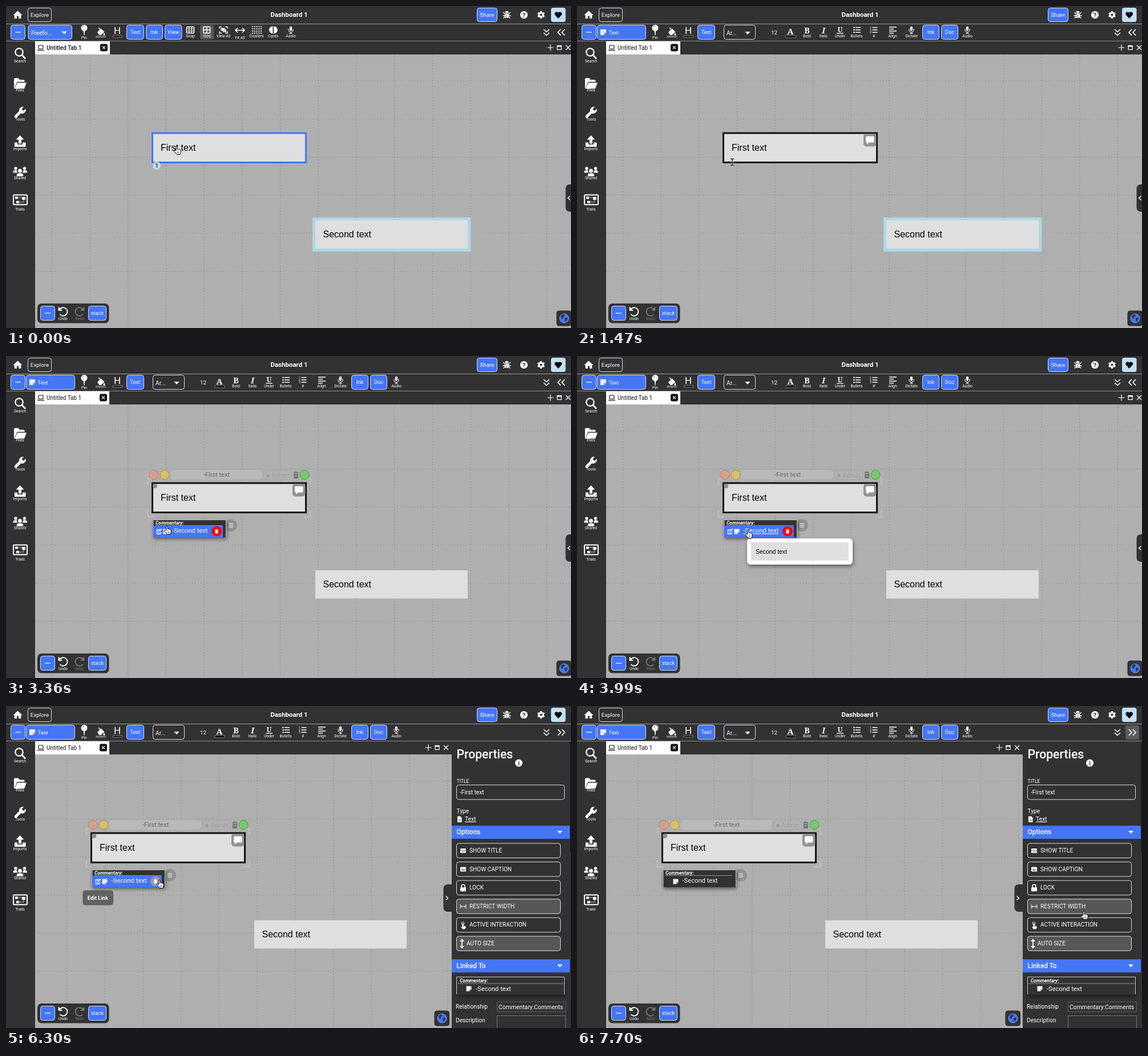
Recreate the animation shown at these times as an HTML page. Size 990 by 565 pixels, loop 8000 ms.

```html
<!DOCTYPE html>
<html lang="en">
<head>
<meta charset="utf-8">
<title>Dashboard</title>
<style>
html, body { margin: 0; width: 100%; height: 100%; overflow: hidden; background: #323232; }
svg { display: block; width: 990px; height: 565px; font-family: Roboto, sans-serif; }
.doc { font-family: "Liberation Sans", Arial, sans-serif; }
</style>
</head>
<body>
<script>
const DARK = '#323232', BLUE = '#4476f7', PAPER = '#dfdfdf', CANVAS = '#afafaf';

// Drawing helpers, each returning SVG markup
const rect = (x, y, w, h, fill, rx = 0, stroke = 'none', sw = 1, attrs = '') =>
  `<rect x="${x}" y="${y}" width="${w}" height="${h}" rx="${rx}" fill="${fill}" stroke="${stroke}" stroke-width="${sw}" ${attrs}/>`;
const circle = (x, y, r, fill, stroke = 'none', sw = 1, attrs = '') =>
  `<circle cx="${x}" cy="${y}" r="${r}" fill="${fill}" stroke="${stroke}" stroke-width="${sw}" ${attrs}/>`;
const shape = (d, fill = '#fff', attrs = '') => `<path d="${d}" fill="${fill}" ${attrs}/>`;
const line = (d, w = 1.5, color = '#fff', attrs = '') =>
  `<path d="${d}" fill="none" stroke="${color}" stroke-width="${w}" ${attrs}/>`;
const text = (x, y, s, size = 10, fill = '#fff', attrs = '') =>
  `<text x="${x}" y="${y}" font-size="${size}" fill="${fill}" ${attrs}>${s}</text>`;
const MID = 'text-anchor="middle"', BOLD = 'font-weight="700"', MEDIUM = 'font-weight="500"', SHADOW = 'filter="url(#shadow)"';
const label = (x, y, s, fill = '#fff') => text(x, y, s, 6.9, fill, MID);
const at = (x, y, body, scale = 1) => `<g transform="translate(${x} ${y}) scale(${scale})">${body}</g>`;
const group = (id, body) => `<g id="${id}">${body}</g>`;
const button = (x, y, w, h, s = '', size = 9.5, fill = BLUE) =>
  rect(x + .5, y + .5, w - 1, h - 1, fill, 4, '#d8dff2') + text(x + w / 2, y + h / 2 + 3.3, s, size, '#fff', MID);
const minus = (x, y) => button(x, y, 26, 26) + line(`M${x + 8} ${y + 13}h10`, 1.2);
const triangle = (x, y) => shape(`M${x - 4.5} ${y - 2}h9l-4.5 5z`);
const note = (x, y, s = 1) => at(x, y, shape('M-5 -5H5V1L1 5H-5z', '#eee') + shape('M1 5V1H5z', '#aaa'), s);
const mic = (x, y, s = 1) => at(x, y, rect(-2.3, -7, 4.6, 9, '#fff', 2.3) + line('M-4.5 -2V0a4.5 4.5 0 0 0 9 0V-2M0 4.5V7M-3 7H3', 1.2), s);
const trash = (x, y) => at(x, y, shape('M-2.7 -2h5.4l-.4 5.5h-4.6zM-3.2 -3.4h6.4v1h-6.4zM-1 -4.2h2v1h-2z'));
const pin = (x, y, s = 1) => at(x, y, circle(0, -6, 5.5, '#fff') + shape('M-1.2 -1h2.4L.5 7h-1z') +
  line('M-3 -7a3 3 0 0 1 2.5 -2.4', .8, DARK), s);
const bars = (x, y, w, gap, sw = 1.4) => line([-1, 0, 1].map(i => `M${x - w / 2} ${y + i * gap}h${w}`).join(''), sw);
const dots = (x, y, nx, ny, gap, r) => Array.from({ length: nx * ny }, (_, i) =>
  circle(x + (i % nx - (nx - 1) / 2) * gap, y + (Math.floor(i / nx) - (ny - 1) / 2) * gap, r, '#fff')).join('');
const person = (x, y, s) => at(x, y, circle(0, -4, 3.6, '#fff') + shape('M-6 6V4a4 4 0 0 1 4-3.6h4A4 4 0 0 1 6 4V6z'), s);
const curl = (x, y, dir, color) => `<g transform="translate(${x} ${y}) scale(${dir} 1)">` +
  line('M-6 -3.5A7.3 7.3 0 1 1 -5.5 5', 1.9, color) + shape('M-8.3 -8.5V-1.3H-1z', color) + '</g>';
const gear = (x, y) => at(x, y, circle(0, 0, 3.6, 'none', '#fff', 3) +
  [0, 60, 120].map(a => line('M0 -6.6V-4.5M0 4.5V6.6', 3, '#fff', `transform="rotate(${a})"`)).join(''));
const bug = (x, y) => at(x, y, shape('M-3.2 -3a3.2 3.2 0 0 1 6.4 0z') + rect(-3.7, -2.2, 7.4, 8.4, '#fff', 3.5) +
  line('M-6.5 -4L-3 -1M6.5 -4L3 -1M-7 2H7M-6 6.5L-3 4M6 6.5L3 4', 1.3) + line('M0 0V6', .8, DARK));
const heading = (x, y) => text(x, y, 'Commentary:', 8.4, '#fff', BOLD + ' font-style="italic"');

function grid() {
  let d = '';
  for (let x = 80.2; x < 1110; x += 66.72) d += `M${x} 85V565`;
  for (let y = 131.7; y < 500; y += 66.72) d += `M51 ${y}H1110`;
  return line(d, 1, '#828282', 'stroke-dasharray="1.2 3.8"');
}

function decorations() {
  return line('M248 226V215H257M525 215H533.5V226M248 271V282.5H258M522 282.5H533.5V271', 2.5, '#bdbdbd') +
    circle(259, 208.5, 8, '#d6a08f', '#bd7f6c') + circle(278, 208.5, 8, '#d6bf6d', '#ad9244') +
    rect(288, 200, 161, 17, '#b9b9b9', 6) + text(369, 212, '-First text', 11, '#686868', MID) +
    rect(451, 201, 50, 16, '#b2b2b2', 7, '#a5a5a5') + circle(459, 210, 3, '#9d9d9d') + text(465, 213, 'Admin', 11, '#9d9d9d') +
    rect(504, 203, 8, 12, '#777', 1.5) + line('M505 206h6M506 210h4', 1.2, '#bbb') +
    circle(523, 208.5, 8, '#75c96c', '#4e9a47') + circle(261, 228, 4, '#8e8e8e');
}

function linkBar() {
  const link = x => rect(x, -2.3, 7, 4.6, 'none', 2.3, '#fff', 1.3);
  return rect(252, 284, 155, 25.5, '#dcdcdc', 12.7) + circle(265, 296.7, 12.5, '#b9dcf5') +
    text(265, 301, '1', 12, '#111', MID) +
    [291, 316.7, 342.3, 368, 393.7].map(x => circle(x, 296.7, 10.7, DARK)).join('') +
    at(291, 296.7, `<g transform="rotate(-45)">${link(-6)}${link(-1)}</g>`) +
    shape('M311.5 294h5l6-.5v1.8l-3 .3v3l-3 2.5h-3l-2.5-3z') + pin(342.3, 297.5, .55) + mic(368, 296.7, .7) + bars(393.7, 296.7, 9, 3.2, 1.2);
}

function linkMenu() {
  return circle(394, 297, 11, '#929292') + bars(394, 297, 8, 3, 1) +
    rect(257.5, 287, 128.5, 31, DARK, 0, 'none', 1, SHADOW) + line('M258 318V287.5H385.5V318', 1, '#ccc') +
    group('rowHover', rect(258, 298, 122, 20, BLUE) +
      line('M271 305H264.5V312H271V308.5M267 309.5L273 303', 1.3) +
      circle(369, 307.5, 9, 'red', 'none', 1, 'id="trashDisc"') + trash(369, 308)) +
    heading(262, 295.5) + line('M262 297.5H379', .7, '#bbb') +
    note(280, 308, .9) + text(291.5, 310, '-Second text', 11.2) + group('underline', line('M291.5 312H353', 1));
}

const preview = rect(298, 320, 185, 46, '#fff', 6, 'none', 1, SHADOW) +
  rect(305, 327, 171, 32, PAPER) + text(313, 346.5, 'Second text', 10.4, '#000', 'class="doc"');

const tip = (x, y, w, h) => rect(x, y, w, h, '#616161', 4, '#585858');

function world() {
  return group('world', grid() +
    group('linkHighlight', rect(537, 371, 277.5, 60, '#add8e6')) + rect(542, 376, 267, 49.5, PAPER) +
    text(555.5, 406, 'Second text', 16, '#000', 'class="doc"') +
    rect(256.5, 223, 269, 51.5, PAPER, 0, BLUE, 3, 'id="firstBox"') +
    text(271, 254, 'First text', 16, '#000', 'class="doc"') +
    group('badge', circle(264, 280, 7, '#b9dcf5') + text(264, 284, '1', 11, '#111', MID)) +
    group('comment', rect(502, 224, 22.5, 22.5, '#929292', 5) + rect(506, 228.5, 14.5, 11, '#fff', 2) + shape('M508 238v5l4-4z')) +
    group('decorations', decorations()) + group('linkBar', linkBar()) + group('linkMenu', linkMenu()) + group('preview', preview) +
    group('linkTip', tip(194.5, 321, 142, 39) +
      text(203, 336.5, 'Tap to view links; double tap', 9.3, '#fff', BOLD) + text(203, 350.5, 'to open link collection', 9.3, '#fff', BOLD)) +
    group('editTip', tip(242, 324, 52.5, 25) + text(268, 340, 'Edit Link', 9.4, '#fff', BOLD + ' ' + MID)));
}

function edge() {
  return group('edge', line('M948.5 73h11M954 67.5v11M981 69l8 8M989 69l-8 8', 1.2) +
    rect(966, 69.5, 7, 7, 'none', 0, '#fff', 1.2) + line('M965.5 70.5h8', 2) +
    shape('M995 313h-7.5a7 7 0 0 0-7 7v34a7 7 0 0 0 7 7h7.5z', DARK) +
    line('M988.5 333.5l-4 3.5 4 3.5', 1.4, '#fff', 'id="handleArrow"') +
    rect(965, 535, 25.5, 26, DARK, 4, '#25272d') + circle(978, 548, 8, BLUE) +
    shape('M972 544q3-4 6-3l1 3-3 2v3l-3-1zM979 548l4-2 1 3-3 5-2-2z', '#273756') + circle(978, 548, 8, 'none', '#7ba4ff', .8));
}

function sidebar() {
  const names = [['Search', 99], ['Files', 150], ['Tools', 201], ['Imports', 253], ['Shared', 304], ['Trails', 359]];
  return rect(0, 62, 51, 503, DARK) + names.map(([s, y]) => label(24.5, y, s)).join('') +
    circle(23, 81, 6.7, 'none', '#fff', 2.2) + line('M28 86l6 6.5', 2.6) +
    shape('M14 146V128q0-1.5 1.5-1.5h6l2.5 3h7q1.5 0 1.5 1.5v2H19.5z') + shape('M20 134.5h16l-4 10.5H15z') +
    line('M17 194L26 185', 4.6, '#fff', 'stroke-linecap="round"') + shape('M23 184a6.5 6.5 0 0 1 8-7l-3.5 4 3 3 4-3.5a6.5 6.5 0 0 1-8 8z') +
    shape('M24.5 227l7 7.5h-4.5v7h-5v-7h-4.5zM15 239.5h5v3.5h9v-3.5h5.5v7.5H15z') +
    person(17, 288, .75) + person(32.5, 288, .75) + circle(24.5, 289, 5.5, DARK) + person(24.5, 293, .95) +
    rect(13, 331.5, 24, 17, 'none', 1.5, '#fff', 2) + rect(16, 334.5, 5, 4, '#fff') + rect(28, 335, 6, 5, '#fff') +
    rect(18, 342, 5, 4, '#fff') + line('M22 336h5M31 340v4h-7', 1, '#fff', 'stroke-dasharray="2 1"');
}

function header() {
  return rect(0, 0, 990, 62, DARK) + rect(0, 31, 990, 1, '#9b9b9b') + rect(0, 61, 990, 1, '#8b8b8b') +
    shape('M20.5 8.5l8 7.5h-2.2v6h-4.3v-4.5h-3v4.5h-4.3v-6H12.5z') + button(38, 3, 42, 25, 'Explore', 9.8, DARK) +
    text(496, 19, 'Dashboard 1', 11.5, '#fff', BOLD + ' ' + MID) +
    button(825, 3, 36, 25, 'Share', 9.8) + bug(877.5, 15) + circle(907.5, 15.5, 6.6, '#fff') +
    text(907.5, 19.5, '?', 11, DARK, BOLD + ' ' + MID) + gear(937.5, 15.5) +
    rect(955, 3, 25.5, 25, '#c1e0f8', 4) + shape('M967.7 22l-5.5-6a3.3 3.3 0 0 1 5.5-4.3 3.3 3.3 0 0 1 5.5 4.3z', '#000') +
    group('collapseHover', rect(961, 34, 24, 25, '#5b5b5b', 3)) +
    line('M942 41l5 4.5 5-4.5M942 47l5 4.5 5-4.5', 1.6) +
    line('M972 41l-5 5.3 5 5.3M979 41l-5 5.3 5 5.3', 1.6, '#fff', 'id="collapseArrow"');
}

function sharedTools() {
  return minus(8, 33) + pin(137, 44.5) + label(137, 57.5, 'Pin') +
    shape('M160 46l6.5-6.5 6 6-6 5.5h-3z') + line('M162 38l5 5', 1.4) + shape('M172 47q3 4 0 5-3-1 0-5z') + rect(157, 52, 18, 3.5, '#777') +
    text(195, 49, 'H', 17, '#fff', MID) + rect(187.5, 51.5, 16, 3.5, '#222', 0, '#888', .8) + button(211, 33, 31, 26, 'Text');
}

function canvasTools() {
  return button(38.5, 33, 77.5, 26) + text(44, 50.5, 'Freefo...', 10.1) + triangle(102, 46.5) +
    button(245, 33, 30, 26, 'Ink') + button(278, 33, 30.5, 26, 'View') +
    rect(340, 33.5, 24, 25, '#5a5a5a', 3) + rect(316.5, 36.5, 13, 11, 'none', 1, '#fff', 1.5) +
    line('M316 40h14M316 44h14M320.8 36v12M325.3 36v12', 1.2) + rect(346, 36.5, 11.5, 11, 'none', 1, '#fff', 1.6) + line('M346 42h12M351.7 36v12', 1.6) +
    line('M374 40v-3.5h4M384 36.5h4v3.5M374 44v3.5h4M384 47.5h4v-3.5', 1.3) + rect(376.5, 38.5, 7, 5, '#fff') + rect(380, 41, 6, 5, '#ddd') +
    line('M402 42.5h16M406 38.5l-4 4 4 4M414 38.5l4 4-4 4', 1.7) + dots(439.5, 42, 5, 4, 3.8, 1.1) +
    shape('M467.5 35.5a6.5 6.5 0 0 0 0 13zM469.3 35.5a6.5 6.5 0 0 1 0 13z') + mic(499, 42, .9) +
    [['Snap', 323], ['Grid', 352], ['View All', 381], ['Fit All', 410, 57.5], ['Clusters', 439], ['Cards', 468], ['Audio', 499]]
      .map(([s, x, y = 55]) => label(x, y, s)).join('');
}

function textTools() {
  const serif = 'text-anchor="middle" font-family="Noto Serif, serif" font-weight="700"';
  return button(35, 33, 86, 26) + note(46, 46) + text(55.5, 49.5, 'Text', 9.5) +
    button(257, 33, 56, 26, '', 10, DARK) + text(262, 50.5, 'Ar...', 10.2) + triangle(299, 47) + text(340, 49.5, '12', 9.8) +
    text(374, 50, 'A', 15, '#fff', serif) + rect(366, 52, 17, 3.5, '#000', 0, '#aaa', .7) +
    text(403, 47.5, 'B', 14, '#fff', serif) + text(432, 47.5, 'I', 14, '#fff', serif + ' font-style="italic"') +
    text(461, 46, 'U', 12, '#fff', serif) + line('M455 48h12', 1.3) +
    bars(492.5, 42, 9, 4.3) + dots(485.5, 42, 1, 3, 4.3, 1.3) + bars(522, 42, 9, 4.3) +
    [1, 2, 3].map(n => text(513, 35.5 + n * 4.3, n, 5)).join('') +
    line('M547 37h13M547 40.5h8M547 44h13M547 47.5h8', 1.4) + mic(586, 42, .9) + mic(684, 42, .9) +
    button(605, 33, 30, 26, 'Ink') + button(638, 33, 30, 26, 'Doc') +
    [['Bold', 403], ['Italic', 432], ['Under', 461], ['Bullets', 490], ['#', 520], ['Align', 553], ['Dictate', 586], ['Audio', 684]]
      .map(([s, x]) => label(x, 55, s)).join('');
}

function tab(id, width, weight) {
  const x = width + 41;
  return group(id, rect(51, 62, width, 23, '#fff') + rect(57, 69, 8, 6, 'none', 1, '#111', 1.2) + line('M55 77.5h12', 1.3, '#111') +
    text(71, 76.5, 'Untitled Tab 1', 10, '#111', `font-weight="${weight}"`) +
    rect(x - 7, 66.5, 13, 13, '#111', 3) + line(`M${x - 3} 70.5l5 5M${x + 2} 70.5l-5 5`, 1.1));
}

function panel() {
  const names = ['SHOW TITLE', 'SHOW CAPTION', 'LOCK', 'RESTRICT WIDTH', 'ACTIVE INTERACTION', 'AUTO SIZE'];
  const icons = [
    rect(-5, -4, 10, 8, '#fff', 1) + line('M-5 -1H5M-3 2H3', .8, DARK),
    rect(-5, -4, 10, 8, '#fff', 1) + text(0, 2, 'cc', 6, DARK, BOLD + ' ' + MID),
    rect(-5, -1, 10, 7, '#fff', 1) + line('M-3 0v-3a3 3 0 0 1 6 0v3', 1.6),
    line('M-5 -4v8M5 -4v8M-4 0h8M-2 -2l-2 2 2 2M2 -2l2 2-2 2', .9),
    shape('M-1.5 -3h2v4l4 1v3l-1.5 2h-4l-3-4h2.5z') + circle(-.5, -3, 2.4, 'none', '#fff', .9),
    line('M-2 -6v12', 1.8) + shape('M-6 -4l4-4.5 4 4.5zM-6 4l4 4.5 4-4.5z')];
  const section = (y, s) => rect(781, y, 207, 23, BLUE) + text(789.5, y + 15.3, s, 12, '#fff', MEDIUM) + triangle(970.5, y + 11);
  return rect(781, 62, 209, 503, DARK) + rect(988, 62, 2, 194, '#1e1e1e') +
    text(789.5, 92, 'Properties', 21.2, '#fff', MEDIUM) + circle(898.5, 100, 6.5, '#fff') + text(898.5, 104, 'i', 10, DARK, BOLD + ' ' + MID) +
    text(789.5, 135, 'TITLE', 8.6) + rect(789.5, 138.5, 189, 25.5, DARK, 4, '#ddd') + text(795, 155, '-First text', 10.2) +
    text(789.5, 188, 'Type', 10.2) + shape('M791 193.5h5l2.5 2.5v8h-7.5z') + line('M792.5 199h4.5M792.5 201.5h4.5', .7, DARK) +
    text(804, 202, 'Text', 10.2, '#fff', 'text-decoration="underline"') + section(210, 'Options') +
    names.map((s, i) => {
      const y = 241 + i * 32.6;
      return rect(789.5, y, 182, 25.5, i === 3 || i === 5 ? '#575757' : DARK, 4, '#ddd') +
        at(801, y + 13, icons[i]) + text(i === 5 ? 807 : 812, y + 16, s, 10.1);
    }).join('') + section(444.5, 'Linked To') +
    rect(789, 475, 190, 31.5, DARK, 0, 'none', 1, SHADOW) + line('M789.5 506V475.5H978.5V506', 1, '#ccc') +
    heading(795, 485) + line('M791 487H977', .7, '#bbb') +
    note(811, 496, .9) + text(823, 499.5, '-Second text', 11.2) +
    text(788, 530.5, 'Relationship', 10.2) + rect(860.5, 519, 120, 17.5, DARK, 0, '#5d5d5d') + text(863, 531.5, 'Commentary:Comments', 10.4) +
    text(788, 554.5, 'Description', 10.2) + rect(860.5, 543.5, 120, 30, DARK, 0, '#777');
}

const bottomBar = rect(55, 522, 125.5, 34.5, DARK, 7) + minus(60, 526) + curl(100, 536, 1, '#fff') + label(100, 551, 'Undo') +
  curl(129, 536, -1, '#777') + label(129, 551, 'Redo', '#777') + button(144, 526, 32, 26, 'stack', 9.3);

const beam = 'M-3 -6q3 0 3 2V4q0 2-3 2M3 -6q-3 0-3 2M3 6q-3 0-3-2M-2 1H2';
const cursors = group('hand', shape('M-1.2 8V1.2a1.2 1.2 0 0 1 2.4 0V5.6a1.2 1.2 0 0 1 2.2.3 1.1 1.1 0 0 1 2 .5 1 1 0 0 1 1.7.8V10.5L6 14.5H.3L-4.7 8.8a1.2 1.2 0 0 1 1.8-1.4z', '#fff', 'stroke="#000"') +
    line('M1.5 9.5v3M3.5 9.5v3', .7, '#000')) +
  group('arrow', shape('M0 0V12.5L3 9.8 5 14 7 13.2 5.2 9.2H9z', '#000', 'stroke="#fff" stroke-width=".9"')) +
  group('ibeam', line(beam, 2.8, '#ddd') + line(beam, 1.2, '#000'));

document.body.innerHTML = `<svg viewBox="0 0 990 565">
  <defs><filter id="shadow" x="-20%" y="-30%" width="140%" height="190%"><feDropShadow dx="1" dy="3" stdDeviation="3" flood-opacity=".5"/></filter></defs>
  ${rect(0, 0, 990, 565, CANVAS)}${world()}${rect(51, 62, 939, 23, DARK)}${edge()}
  ${tab('tabBold', 131, 500)}${tab('tabPlain', 130, 400)}${sidebar()}${header()}${sharedTools()}
  ${group('canvasTools', canvasTools())}${group('textTools', textTools())}${group('panel', panel())}${bottomBar}
  ${group('ring', circle(266, 293, 26, 'none', '#111', 1.4))}${group('cursor', cursors)}</svg>`;

const el = id => document.getElementById(id);
const show = (id, on) => { el(id).style.display = on ? '' : 'none'; };
const between = (t, a, b) => t >= a && t < b;
const clamp = v => Math.min(1, Math.max(0, v));
const ease = v => v * v * (3 - 2 * v);

// Cursor path: time, hotspot x, y
const path = [[0, 299, 246], [280, 299, 246], [700, 279, 255], [1330, 279, 262], [1470, 272, 274], [2100, 265, 292],
  [2940, 265, 292], [3710, 295, 303], [3990, 300, 305], [4760, 300, 305], [5460, 271, 304], [6090, 271, 304],
  [6160, 269, 305], [6720, 269, 305], [7490, 844, 338], [7700, 888, 360], [8000, 888, 360]];

function cursorAt(t) {
  const i = path.findIndex(p => p[0] > t), [t0, x0, y0] = path[i - 1], [t1, x1, y1] = path[i];
  const k = ease((t - t0) / (t1 - t0));
  return [x0 + (x1 - x0) * k, y0 + (y1 - y0) * k];
}

function draw(t) {
  const editing = t >= 840, decorated = t >= 1610, menu = t >= 2940, open = t >= 6300;
  show('canvasTools', !editing); show('textTools', editing);
  show('tabBold', !editing); show('tabPlain', editing);
  show('badge', !editing); show('comment', editing);
  el('firstBox').setAttribute('stroke', editing ? '#111' : BLUE);
  show('linkHighlight', !decorated); show('decorations', decorated);
  show('linkBar', decorated && !menu); show('linkMenu', menu);
  show('linkTip', between(t, 2170, 3010)); show('ring', between(t, 2520, 2590));
  show('rowHover', between(t, 3220, 6790)); show('underline', between(t, 3640, 4970));
  show('preview', between(t, 3640, 4830));
  el('trashDisc').setAttribute('fill', open ? '#999' : 'red');

  const grow = clamp((t - 5440) / 200), sx = .8 + .2 * grow, sy = .6 + .4 * grow;
  show('editTip', between(t, 5460, 6860));
  el('editTip').setAttribute('transform', `translate(${268 * (1 - sx)} ${324 * (1 - sy)}) scale(${sx} ${sy})`);
  el('editTip').setAttribute('opacity', .15 + .85 * grow);

  show('panel', open); show('collapseHover', t >= 6370);
  el('world').setAttribute('transform', `translate(${open ? -107 : 0})`);
  el('edge').setAttribute('transform', `translate(${open ? -214 : 0})`);
  el('handleArrow').setAttribute('transform', open ? 'translate(1973) scale(-1 1)' : '');
  el('collapseArrow').setAttribute('transform', open ? 'translate(1946) scale(-1 1)' : '');

  const kind = between(t, 840, 1680) ? 'ibeam' : between(t, 4970, 6090) || between(t, 6860, 7560) ? 'arrow' : 'hand';
  for (const id of ['hand', 'arrow', 'ibeam']) show(id, id === kind);
  el('cursor').setAttribute('transform', `translate(${cursorAt(t)})`);
}

const start = performance.now();
function tick() {
  const t = (performance.now() - start) % 8000;
  draw(Math.floor(t / 70) * 70);
  requestAnimationFrame(tick);
}
tick();
</script>
</body>
</html>
```
